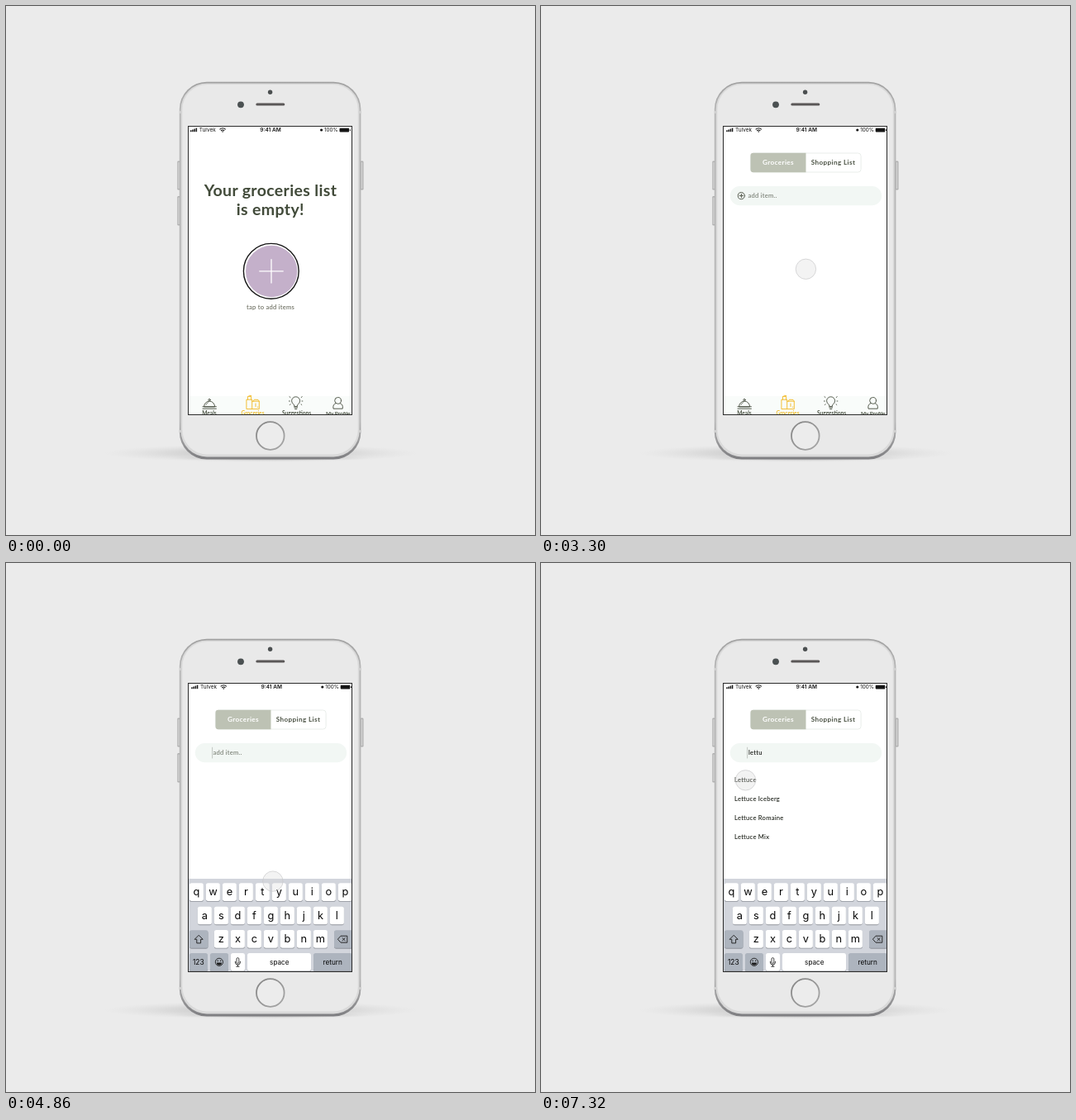
Animation of 640 by 640 pixels, one loop 8000 ms. Source, as an HTML page:

```html
<!DOCTYPE html>
<html lang="en">
<head>
<meta charset="utf-8">
<title>Groceries list</title>
<style>
  html, body { margin: 0; width: 100%; height: 100%; overflow: hidden; background: #ebebeb; }
  svg { display: block; width: 100vw; height: 100vh; }
  text { font-family: Lato, sans-serif; }
  .sys, .sys text { font-family: Inter, "Liberation Sans", sans-serif; }
  .small { font-size: 7.6px; font-weight: 500; letter-spacing: .24px; }
  .bold { font-weight: 700; }
  .mid { text-anchor: middle; }
  .line { fill: none; stroke: #4d5446; stroke-width: .95; stroke-linecap: round; stroke-linejoin: round; }
  .gold { stroke: #f3bb2a; }
</style>
</head>
<body>
<svg viewBox="0 0 640 640" xmlns="http://www.w3.org/2000/svg">
  <defs>
    <linearGradient id="rim" x1="0" y1="0" x2="0" y2="1">
      <stop offset="0" stop-color="#a0a0a0"/>
      <stop offset=".08" stop-color="#b6b6b6"/>
      <stop offset=".9" stop-color="#b6b6b6"/>
      <stop offset="1" stop-color="#7e7e81"/>
    </linearGradient>
    <linearGradient id="ring" x1="0" y1="0" x2="1" y2="1">
      <stop offset="0" stop-color="#858585"/>
      <stop offset="1" stop-color="#a8a8a8"/>
    </linearGradient>
    <radialGradient id="shade">
      <stop offset="0" stop-color="#888" stop-opacity=".5"/>
      <stop offset=".6" stop-color="#999" stop-opacity=".2"/>
      <stop offset="1" stop-color="#bbb" stop-opacity="0"/>
    </radialGradient>
    <clipPath id="glass"><rect x="221" y="146" width="197" height="348.3"/></clipPath>
  </defs>

  <rect width="640" height="640" fill="#ebebeb"/>
  <ellipse cx="308" cy="541" rx="190" ry="11" fill="url(#shade)"/>
  <ellipse cx="320" cy="547" rx="122" ry="4" fill="url(#shade)"/>

  <!-- phone -->
  <g fill="#b0b0b0">
    <rect x="207.3" y="187.5" width="4" height="35" rx="1.2"/>
    <rect x="207.3" y="230" width="4" height="35.5" rx="1.2"/>
    <rect x="428.5" y="187.5" width="4" height="35" rx="1.2"/>
  </g>
  <g fill="#d6d6d6">
    <rect x="208.4" y="189" width="1.4" height="32"/>
    <rect x="208.4" y="231.5" width="1.4" height="32.5"/>
    <rect x="429.8" y="189" width="1.4" height="32"/>
  </g>
  <rect x="209.8" y="91.8" width="219.6" height="456.6" rx="33" fill="url(#rim)"/>
  <rect x="211.6" y="93.4" width="216" height="452" rx="31.5" fill="#d9d9d9"/>
  <rect x="213.4" y="95" width="212.4" height="447.5" rx="30" fill="#e9e9e9"/>
  <g fill="#d0d0d0">
    <rect x="209.8" y="127" width="2.6" height="3"/>
    <rect x="426.8" y="127" width="2.6" height="3"/>
    <rect x="209.8" y="513" width="2.6" height="3"/>
    <rect x="426.8" y="513" width="2.6" height="3"/>
  </g>
  <circle cx="319.6" cy="104.2" r="2.7" fill="#4b4f50"/>
  <circle cx="284" cy="119.3" r="3.9" fill="#4b5152"/>
  <rect x="302.3" y="117.6" width="35" height="3" rx="1.5" fill="#5a5757"/>
  <circle cx="319.8" cy="520" r="16.8" fill="#ececec" stroke="url(#ring)" stroke-width="1.8"/>
  <rect x="220.5" y="145.5" width="198" height="349" fill="#fff"/>

  <g clip-path="url(#glass)">
    <g id="status" class="sys" font-size="6.5" fill="#151515">
      <rect x="223" y="150.3" width="1.5" height="1.9"/>
      <rect x="225.2" y="149.5" width="1.5" height="2.7"/>
      <rect x="227.4" y="148.6" width="1.5" height="3.6"/>
      <rect x="229.6" y="147.6" width="1.5" height="4.6"/>
      <text x="233.8" y="152.4">Tulvek</text>
      <g fill="none" stroke="#151515" stroke-width="1.1">
        <path d="M258.5 149.4q3.6-3.2 7.2 0"/>
        <path d="M260 151q2.1-1.9 4.2 0"/>
      </g>
      <circle cx="262.1" cy="152" r=".8"/>
      <text x="320" y="152.4" class="mid" font-weight="600">9:41 AM</text>
      <circle cx="381.6" cy="150" r="1.6"/>
      <text x="385" y="152.4" font-size="6.3">100%</text>
      <rect x="403.5" y="147.7" width="11.6" height="4.8" rx="1"/>
      <rect x="415.8" y="149.2" width="1.1" height="1.8" rx=".5"/>
    </g>

    <g id="tabs">
      <rect x="221" y="472" width="197" height="23" fill="#f9fcfa"/>
      <g class="line">
        <path d="M239.6 484.6a6.5 6.5 0 0 1 13 0z"/>
        <path d="M238 487.2h16.4M238 484.7h16.4"/>
        <circle cx="246.1" cy="476.6" r="1.2"/>
        <path d="M242 482.4q.7-2.1 2.6-2.8" stroke-width=".7"/>
      </g>
      <g class="line gold">
        <path d="M291.3 476.2h6.4v11.4h-6.4zM292.4 476v-3.6h4.2v3.6M293.4 472.3l1-1.1 2.3.4"/>
        <path d="M297.7 478.2h8.6v9.4h-8.6M299.2 478.2l1.2-2 4.6.2 1.3 1.8M302 481v3.5M304.3 485.2h.6"/>
      </g>
      <g class="line">
        <path d="M348.6 484v-1.4q-3-2-3-4.8a5 5 0 0 1 10 0q0 2.8-3 4.8v1.4z"/>
        <path d="M348.8 485.8h3.8M349.6 487.6h2.2"/>
        <path d="M344 473.5l-1-.8M357.2 473.5l1-.8M343.3 478h-.9M358 478h.9M344.2 481.8l-.8.7M357 481.8l.8.7"/>
      </g>
      <g class="line">
        <circle cx="401.6" cy="477.4" r="3.9"/>
        <path d="M399 480.6q-4 1.4-3 6.6h11.2q1-5.2-3-6.6"/>
      </g>
      <g class="mid bold" font-size="6.6" fill="#4d5446">
        <text x="246" y="494.8">Meals</text>
        <text x="298.5" y="494.8" fill="#f3bb2a">Groceries</text>
        <text x="351.5" y="494.8">Suggestions</text>
        <text x="401.8" y="494.8" font-size="6.4">My Profile</text>
      </g>
    </g>

    <g id="empty">
      <g class="mid bold" font-size="19.5" letter-spacing=".35" fill="#414a39">
        <text x="320" y="229.8">Your groceries list</text>
        <text x="319.8" y="252.8">is empty!</text>
      </g>
      <circle cx="320.8" cy="320.8" r="33.4" fill="#fff" stroke="#161616" stroke-width="1.4"/>
      <circle cx="321.2" cy="321" r="31.2" fill="#c4b0ca"/>
      <path d="M306.3 320.8h29.4M321 306.2v29.2" stroke="#fff" stroke-width="1.3"/>
      <text class="small mid" x="320" y="366.6" fill="#66685a">tap to add items</text>
    </g>

    <g id="list">
      <rect x="253.5" y="178" width="133.6" height="23" rx="3.5" fill="#fff" stroke="#e9edea"/>
      <path d="M320.5 177.7h-63.5a3.5 3.5 0 0 0-3.5 3.5v16.6a3.5 3.5 0 0 0 3.5 3.5h63.5z" fill="#bdc2b4"/>
      <g class="mid bold" font-size="8.2" letter-spacing=".35">
        <text x="287" y="192.2" fill="#fff">Groceries</text>
        <text x="353.6" y="192.2" fill="#4d5446">Shopping List</text>
      </g>
      <g id="field">
        <rect x="228.8" y="218" width="183.4" height="23.2" rx="11.6" fill="#f2f7f4"/>
        <g id="plus" class="line">
          <circle cx="242.4" cy="229.6" r="4.1"/>
          <path d="M240.2 229.6h4.4M242.4 227.4v4.4"/>
        </g>
        <path id="caret" d="M249.6 222.8v13.6" stroke="#b4b9b5" stroke-width=".8"/>
        <text id="hint" class="small" x="250.4" y="232.2" fill="#757b70">add item..</text>
        <text id="typed" class="small" x="251" y="232.2" fill="#0c0e0a">lettu</text>
      </g>
      <g id="results" class="small" fill="#161a12"></g>
    </g>

    <g id="keys" class="sys"></g>
    <circle id="dot" r="12.2" fill="#d2d2d2" fill-opacity=".28" stroke="#c9c9cb" stroke-width=".7"/>
  </g>
  <rect x="220.5" y="145.5" width="198" height="349" fill="none" stroke="#2b2b2b"/>
</svg>

<script>
const LOOP = 8000;
const NS = "http://www.w3.org/2000/svg";
const $ = id => document.getElementById(id);

function add(parent, tag, attrs, label) {
  const el = document.createElementNS(NS, tag);
  for (const k in attrs) el.setAttribute(k, attrs[k]);
  if (label) el.textContent = label;
  parent.appendChild(el);
  return el;
}

function buildKeyboard() {
  const g = $("keys");
  add(g, "rect", { x: 221, y: 382, width: 198, height: 114, fill: "#d2d5dc" });
  const key = (x, y, w, grey) => {
    add(g, "rect", { x, y: y + 0.9, width: w, height: 21.6, rx: 2.6, fill: "#8f939a" });
    add(g, "rect", { x, y, width: w, height: 21.6, rx: 2.6, fill: grey ? "#adb4be" : "#fff" });
  };
  const label = (x, y, size, s) =>
    add(g, "text", { x, y, "font-size": size, fill: "#060606", class: "mid" }, s);

  const rows = [["qwertyuiop", 230.4], ["asdfghjkl", 240.4], ["zxcvbnm", 260.4]];
  rows.forEach(([row, left], r) => {
    const y = 387.3 + r * 28.4;
    [...row].forEach((c, i) => {
      const x = left + i * 20;
      key(x - 8.5, y, 17);
      label(x, y + 14.9, 12.8, c);
    });
  });
  key(222, 444.2, 22.5, true);
  key(397, 444.2, 22.5, true);
  const y = 472;
  key(222, y, 22, true);
  key(247, y, 22, true);
  key(272, y, 17);
  key(292, y, 77);
  key(372, y, 47, true);
  label(232.8, 485.8, 8.4, "123");
  label(330.8, 485.6, 8.2, "space");
  label(395.2, 485.6, 8.2, "return");

  const ink = d => add(g, "path", {
    d, fill: "none", stroke: "#1b1b1b", "stroke-width": 0.9, "stroke-linejoin": "round"
  });
  ink("M233.2 450.3l5 5h-2.6v4.6h-4.8v-4.6h-2.6z");
  ink("M401.4 455.2l3.6-4h7.8v8h-7.8zM406.7 453.3l3.8 3.8M410.5 453.3l-3.8 3.8");
  ink("M280.4 486v2M278.4 488.2h4M277.4 481.8v1.2a3 3 0 0 0 6 0v-1.2");
  add(g, "rect", {
    x: 279, y: 477.6, width: 2.8, height: 6.8, rx: 1.4,
    fill: "none", stroke: "#1b1b1b", "stroke-width": 0.8
  });
  add(g, "circle", { cx: 257.9, cy: 482.8, r: 4.6, fill: "none", stroke: "#1b1b1b", "stroke-width": 0.9 });
  add(g, "path", { d: "M254.8 483.4h6.2a3.1 3.1 0 0 1-6.2 0z", fill: "#1b1b1b" });
  for (const cx of [256.2, 259.6]) add(g, "circle", { cx, cy: 481.2, r: 0.8, fill: "#1b1b1b" });
}

["Lettuce", "Lettuce Iceberg", "Lettuce Romaine", "Lettuce Mix"].forEach((s, i) =>
  add($("results"), "text", { x: 234, y: 264.9 + i * 23.15 }, s));
buildKeyboard();

const clamp = v => Math.max(0, Math.min(1, v));

// Cubic bezier with y1 = 0 and y2 = 1
function bezier(u, x1, x2) {
  let lo = 0, hi = 1;
  for (let i = 0; i < 24; i++) {
    const s = (lo + hi) / 2, q = 1 - s;
    if (3 * q * q * s * x1 + 3 * q * s * s * x2 + s * s * s < u) lo = s; else hi = s;
  }
  return lo * lo * (3 - 2 * lo);
}
const quick = u => bezier(u, 0.25, 0.1);
const even = u => bezier(u, 0.4, 0.5);

const start = [385, 160];
const moves = [
  { at: 1230, dur: 560, to: [322, 320], ease: quick },
  { at: 3270, dur: 570, to: [239.8, 230], ease: quick },
  { at: 4470, dur: 690, to: [333, 404], ease: quick },
  { at: 5280, dur: 810, to: [397.5, 427], ease: even },
  { at: 6660, dur: 630, to: [247.5, 262.8], ease: quick }
];
const SHOW = 1260, LIST = 2070, TYPE = 3870, FOUND = 6180;

function pointer(t) {
  let [x, y] = start;
  for (const m of moves) {
    const p = m.ease(clamp((t - m.at) / m.dur));
    x += (m.to[0] - x) * p;
    y += (m.to[1] - y) * p;
  }
  return [x, y];
}

const show = (id, on) => $(id).setAttribute("display", on ? "inline" : "none");
const shift = (id, x, y) => $(id).setAttribute("transform", `translate(${x.toFixed(2)} ${y.toFixed(2)})`);
const settle = (size, ms, tau) => size * Math.exp(-ms / tau);

function draw(t) {
  const listed = t >= LIST, typing = t >= TYPE, found = t >= FOUND;
  show("empty", !listed);
  show("list", listed);
  show("plus", !typing);
  show("caret", typing);
  show("hint", !found);
  show("typed", found);
  show("results", found);
  show("keys", typing);
  show("dot", t >= SHOW);
  shift("status", listed ? 1.2 : 0, 0);
  shift("field", listed ? settle(197, t - LIST + 30, 98) : 0, 0);
  shift("keys", 0, typing ? settle(112, t - TYPE + 30, 48) : 0);
  shift("dot", ...pointer(t));
}

const t0 = performance.now();
function tick() {
  draw((performance.now() - t0) % LOOP);
  requestAnimationFrame(tick);
}
tick();
</script>
</body>
</html>
```
